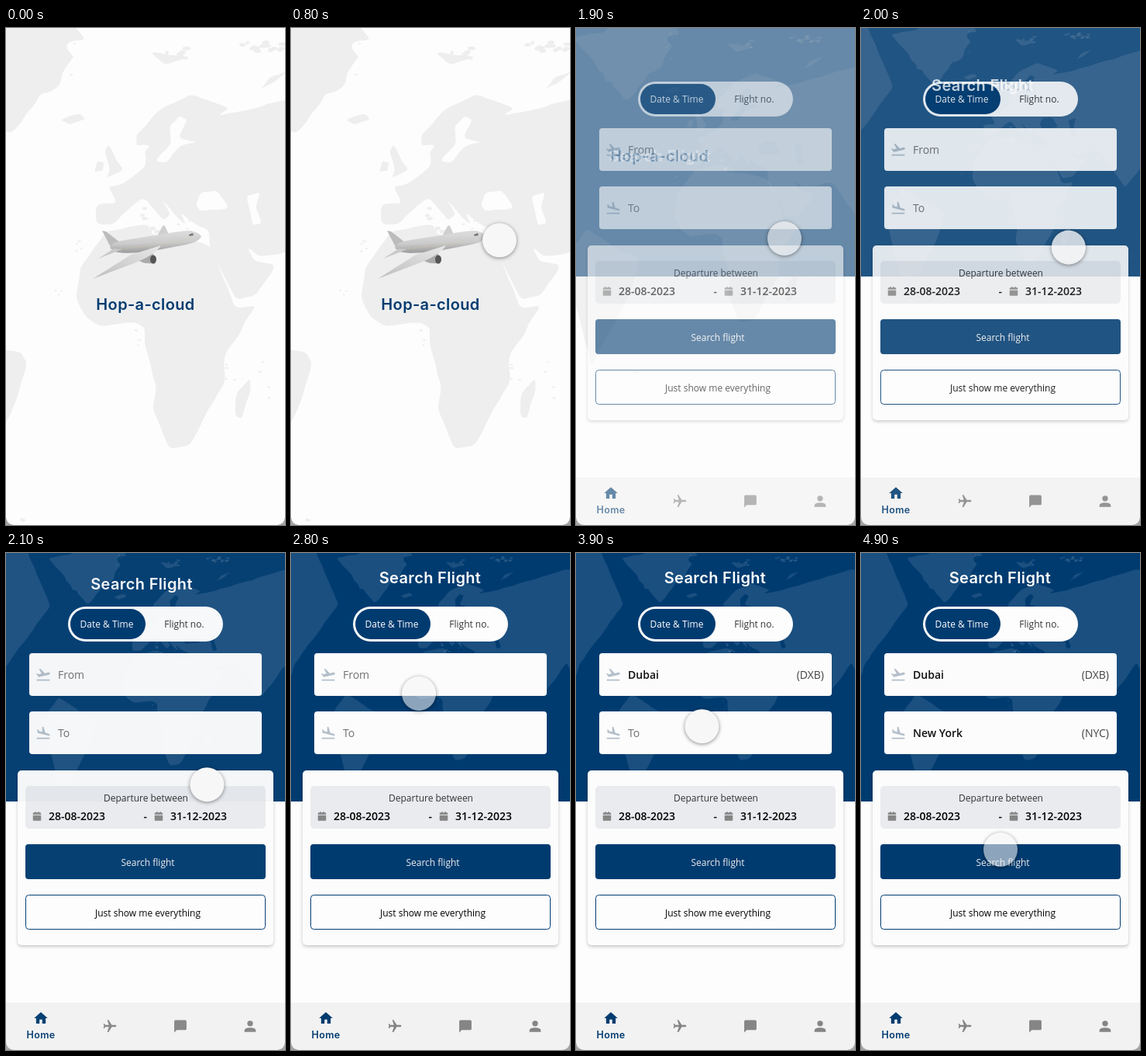
These frames come from a looping animation (360x640 px, 5000 ms). An HTML page:

```html
<!DOCTYPE html>
<html lang="en">
<head>
<meta charset="utf-8">
<title>Flight search</title>
<style>
  html, body { margin: 0; width: 100%; height: 100%; overflow: hidden; background: #fdfdfd; }
  svg { display: block; width: 100%; height: 100%; }
  text { font: 12px "Open Sans", "Noto Sans", sans-serif; }
  .title { font: 600 20px Inter, sans-serif; letter-spacing: .35px; }
  .mid { text-anchor: middle; }
  .field { font-size: 14px; }
  .bold { font-weight: 600; }
  .card { filter: drop-shadow(0 2px 2px rgba(0, 0, 0, .22)); }
  #cursor {
    position: absolute; left: -22px; top: -22px; width: 44px; height: 44px;
    border-radius: 50%; box-shadow: 0 1px 5px rgba(0, 0, 0, .45);
  }
</style>
</head>
<body>
<svg viewBox="0 0 360 640">
  <defs>
    <linearGradient id="hull" x1="0" y1="0" x2=".12" y2="1">
      <stop offset=".2" stop-color="#dadada"/>
      <stop offset=".6" stop-color="#cbcbcb"/>
      <stop offset="1" stop-color="#9c9c9c"/>
    </linearGradient>
    <linearGradient id="wing" x1="1" y1="0" x2="0" y2="1">
      <stop stop-color="#e9e9e9"/>
      <stop offset="1" stop-color="#bdbdbd"/>
    </linearGradient>
    <clipPath id="headerClip"><rect width="360" height="320"/></clipPath>
    <g id="world"></g>
  </defs>

  <rect width="360" height="640" fill="#fdfdfd"/>
  <g id="paleMap" fill="#eee"><use href="#world" class="map"/></g>

  <g id="plane">
    <path d="M195 268L202 255Q205 253 206 257L210 266Z" fill="#cfcfcf"/>
    <path d="M124 261L129 262L151 279L136 284Z" fill="#bcbcbc"/>
    <path d="M134 283Q138 275 154 273L205 265Q226 261 239 261Q251 264 252 269Q248 276 232 279L190 287Q155 292 140 288Z" fill="url(#hull)"/>
    <path d="M147 284Q195 281 237 271" fill="none" stroke="#d9c6a2" stroke-dasharray="1.5 2.5"/>
    <path d="M236 266L241 264L242 267L237 268Z" fill="#777"/>
    <path d="M150 285L139 284L119 297Z" fill="#c9c9c9"/>
    <path d="M169 295Q177 289 190 291L193 299Q191 304 184 303Q174 303 169 297Z" fill="#aaa"/>
    <ellipse cx="190" cy="298" rx="4" ry="5.5" fill="#555"/>
    <path d="M200 280L161 292L112 323L170 301Q193 291 200 280Z" fill="url(#wing)"/>
  </g>

  <g id="header" clip-path="url(#headerClip)">
    <rect width="360" height="320" fill="#003b70"/>
    <g fill="#fff" fill-opacity=".1"><use href="#world" class="map"/></g>
  </g>

  <g class="home">
    <rect x="80" y="69" width="200" height="45" rx="22.5" fill="#fdfdfd"/>
    <rect x="83" y="72" width="97" height="39" rx="19.5" fill="#003b70"/>
    <text class="mid" x="130" y="96" fill="#fff">Date &amp; Time</text>
    <text class="mid" x="230" y="96" fill="#333">Flight no.</text>
    <g id="fields"></g>
  </g>

  <g class="home">
    <g class="card"><rect x="15" y="280" width="330" height="225" rx="5" fill="#fcfcfc"/></g>
    <rect x="25" y="300" width="310" height="55" rx="5" fill="#eaebee"/>
    <text class="mid" x="180.5" y="320" fill="#333">Departure between</text>
    <g id="dates"></g>
    <rect x="25" y="375" width="310" height="45" rx="4" fill="#003b70"/>
    <text class="mid" x="183" y="403" fill="#eee">Search flight</text>
    <rect x="25.5" y="440.5" width="309" height="44" rx="4" fill="#fdfdfd" stroke="#003b70"/>
    <text class="mid" x="183" y="468">Just show me everything</text>
    <rect y="579" width="360" height="61" fill="#f2f2f2"/>
    <g id="nav"></g>
    <text class="title mid" x="45" y="625" fill="#003b70" style="font-size:12.5px">Home</text>
  </g>

  <text id="brand" class="title mid" fill="#003b70">Hop-a-cloud</text>
  <text id="heading" class="title mid" fill="#fff">Search Flight</text>
  <path d="M0 630Q1 639 10 640H0ZM360 630Q359 639 350 640H360Z" fill="#a5a5a5"/>
</svg>
<div id="cursor"></div>
<script>
const $ = id => document.getElementById(id);
const lerp = (a, b, p) => a + (b - a) * p;
const clamp = v => Math.min(1, Math.max(0, v));
const smooth = p => p * p * (3 - 2 * p);
const easeOut = (t, start) => 1 - (1 - clamp((t - start) / 500)) ** 4;

let seed = 7;
const random = () => (seed = seed * 16807 % 2147483647) / 2147483647;
const jitter = size => (random() - .5) * size;

// Closed coast through a few key points, with small random bays on each side.
function coast(keyPoints, rough = 5) {
  const keys = keyPoints.split(' ').map(pair => pair.split(',').map(Number));
  const points = keys.flatMap(([x, y], i) => {
    const [nextX, nextY] = keys[(i + 1) % keys.length];
    const steps = Math.max(2, Math.round(Math.hypot(nextX - x, nextY - y) / 14));
    return Array.from({ length: steps }, (_, k) => k
      ? [lerp(x, nextX, k / steps) + jitter(rough), lerp(y, nextY, k / steps) + jitter(rough)]
      : [x, y]);
  });
  const middle = i => {
    const a = points[i], b = points[(i + 1) % points.length];
    return `${(a[0] + b[0]) / 2} ${(a[1] + b[1]) / 2}`;
  };
  return `M${middle(points.length - 1)}` + points.map((p, i) => `Q${p} ${middle(i)}`).join('') + 'Z';
}

const islands = (x, y, width, height, count, size = 1.5) => Array.from({ length: count }, () =>
  `<ellipse cx="${x + random() * width}" cy="${y + random() * height}" rx="${size * (.7 + random())}" ry="${size * .8}"/>`).join('');

const eurasia = coast('117,252 117,227 143,226 132,204 150,201 180,178 179,160 186,151 168,152 168,137 202,102 240,85 288,104 274,113 300,108 362,92 500,50 700,90 640,150 580,290 530,350 500,290 440,370 380,285 325,294 311,283 320,300 348,305 322,345 297,350 264,288 262,260 240,250 225,238 232,254 200,220 212,240 203,248 178,218 140,252', 3);
const seas = ['245,228 252,211 272,209 288,232 250,236', '310,216 328,211 322,230 330,251 318,254', '192,171 213,150 211,126 224,113 234,118 222,141 247,147 224,152 208,173'];
const greenland = coast('0,-8 84,-8 104,16 76,24 88,36 74,56 70,74 38,98 4,138 -95,20', 14);
const lands = [
  '70,119 95,110 102,118 82,125',                                                                   // Iceland
  '129,193 134,182 127,160 132,150 142,170 152,182',                                                // Britain
  '114,186 118,171 127,173 125,184',                                                                // Ireland
  '129,262 183,253 188,266 232,271 263,280 295,360 322,357 281,425 283,456 236,538 211,542 189,490 194,460 179,408 179,386 165,379 120,384 104,373 90,345 96,308', // Africa
  '315,451 315,470 305,502 296,500 297,470',                                                        // Madagascar
  '0,415 20,418 27,430 10,487 -60,620 -110,430 -70,370',                                            // South America
  '-380,30 -300,0 -150,0 -90,140 -200,290 -220,350 -320,250',                                       // North America
  '560,430 640,390 670,440 640,490',                                                                // Australia
  '186,31 238,38 205,48',                                                                           // Arctic islands
  '327,80 340,63 364,55 343,72'
];

$('world').innerHTML =
  `<path fill-rule="evenodd" d="${eurasia}${seas.map(s => coast(s, 2)).join('')}"/>` +
  `<path d="${greenland}${lands.map(l => coast(l, 3)).join('')}"/>` +
  islands(305, 18, 55, 12, 16, 3) + islands(205, 26, 30, 14, 5, 3) + islands(76, 12, 20, 60, 6) +
  islands(85, 270, 14, 25, 4) + islands(62, 338, 10, 8, 3) + islands(165, 385, 10, 25, 4) +
  islands(282, 420, 18, 35, 5) + islands(328, 420, 14, 66, 4) + islands(176, 232, 5, 18, 4, 2.5) +
  islands(184, 257, 14, 6, 4, 3) + islands(222, 240, 16, 22, 5) + islands(16, 630, 8, 4, 3, 2);

const icons = {
  home: 'M12 3L2 12H5V20H10V14H14V20H19V12H22z',
  flight: 'M21 16v-2l-8-5V3.5a1.5 1.5 0 00-3 0V9l-8 5v2l8-2.5V19l-2 1.5V22l3.5-1 3.5 1v-1.5L13 19v-5.5z',
  chat: 'M4 2H20q2 0 2 2V16q0 2-2 2H6l-4 4V4q0-2 2-2z',
  person: 'M8 8a4 4 0 018 0 4 4 0 01-8 0zM4 20v-2q0-4 8-4t8 4v2z',
  takeoff: 'M2 19h20v2H2zM1 10l1.5-.4 2 1.6 5-1.4L5.500 3l2-.5 7 7 5.500-1.400q2-.2 2.500 1.500 0 1.400-1.500 2L5 15.300z',
  landing: 'M2 19h20v2H2zM3 6l1.500.4 1 2.400 5 1.400V2l2 .5 2.700 9 5.300 1.400q2 .8 1.800 2-.5 1.500-2 1L3 11.500z',
  calendar: 'M5 4h2V2h3v2h4V2h3v2h2q2 0 2 2v2H3V6q0-2 2-2zM3 10h18v10q0 2-2 2H5q-2 0-2-2z'
};
const icon = (name, x, y, size, color = '#858585', turn = 0) =>
  `<path d="${icons[name]}" fill="${color}" transform="translate(${x} ${y}) rotate(${turn}) scale(${size / 24}) translate(-12 -12)"/>`;

$('nav').innerHTML = icon('home', 45, 599, 21, '#003b70') + icon('flight', 134, 609.5, 20, '#858585', 90) +
  icon('chat', 225, 609.5, 19) + icon('person', 315, 609.5, 22);

const date = (x, day) => icon('calendar', x, 339, 14) + `<text class="field bold" x="${x + 15}" y="344">${day}</text>`;
$('dates').innerHTML = date(40, '28-08-2023') + date(197, '31-12-2023') +
  '<text class="field bold" x="177.5" y="344">-</text>';

const field = (y, symbol, hint, city, code, id) => `
  <rect x="30" y="${y}" width="300" height="55" rx="4" fill="#fcfcfc"/>
  ${icon(symbol, 48, y + 28, 20, '#b4bfca')}
  <text class="field" id="${id}Hint" x="67" y="${y + 33}" fill="#707070">${hint}</text>
  <g id="${id}Value">
    <text class="field bold" x="67" y="${y + 33}" fill="#111">${city}</text>
    <text class="field" x="320" y="${y + 33}" fill="#444" text-anchor="end">${code}</text>
  </g>`;
$('fields').innerHTML = field(129, 'takeoff', 'From', 'Dubai', '(DXB)', 'from') +
  field(204, 'landing', 'To', 'New York', '(NYC)', 'to');

// The pointer presses each stop from `down` to `up`; `dip` bends the way there.
const taps = [
  { down: -100, up: 400, x: 269, y: 340 },
  { down: 850, up: 1950, x: 269, y: 271 },
  { down: 2750, up: 3450, x: 165, y: 181, dip: 64 },
  { down: 4050, up: 4400, x: 162, y: 231 },
  { down: 4850, up: 5100, x: 180, y: 382 }
];
function pointerAt(t) {
  const i = taps.findIndex(tap => t < tap.up);
  const to = taps[i], from = taps[i - 1] || to;
  const way = clamp((t - from.up) / (to.down - from.up)), p = smooth(way);
  const pressed = i && clamp((t - to.down + 50) / 100) + (i > 1 ? clamp(1 - (t - from.up) / 100) : 0);
  return {
    x: lerp(from.x, to.x, p),
    y: lerp(from.y, to.y, p) + (to.dip || 0) * Math.sin(Math.PI * way),
    alpha: lerp(1, .57, pressed)
  };
}

const homeParts = document.querySelectorAll('.home');
const maps = document.querySelectorAll('.map');

function draw(t) {
  const leave = easeOut(t, 900), enter = easeOut(t, 1800);

  $('plane').setAttribute('transform', `translate(${200 * leave})`);
  $('plane').style.opacity = lerp(1, .03, leave) * (1 - enter);

  const mapPlace = `translate(${106 * enter} ${-4 * enter}) scale(${lerp(1, .5, enter)})`;
  maps.forEach(m => m.setAttribute('transform', mapPlace));
  $('paleMap').style.opacity = 1 - enter ** 3;
  $('header').style.opacity = enter;
  homeParts.forEach(g => g.style.opacity = enter);

  for (const id of ['brand', 'heading']) {
    $(id).setAttribute('x', lerp(lerp(180, 5, leave), 179.5, enter));
    $(id).setAttribute('y', lerp(363, 39, enter));
  }
  $('brand').style.opacity = lerp(1, .03, leave) * (1 - enter) + 1.6 * enter * (1 - enter);
  $('heading').style.opacity = enter ** 2;

  for (const [id, start] of [['from', 3300], ['to', 4200]]) {
    const filled = easeOut(t, start);
    $(id + 'Hint').style.opacity = 1 - filled;
    $(id + 'Value').style.opacity = filled;
  }

  const { x, y, alpha } = pointerAt(t);
  $('cursor').style.transform = `translate(${x}px, ${y}px)`;
  $('cursor').style.background = `rgba(247, 247, 247, ${alpha})`;
  $('cursor').style.opacity = clamp(t / 200);
}

const began = performance.now();
function tick() {
  const t = (performance.now() - began) % 5000;
  draw(Math.floor(t / 100) * 100);
  requestAnimationFrame(tick);
}
tick();
</script>
</body>
</html>
```
